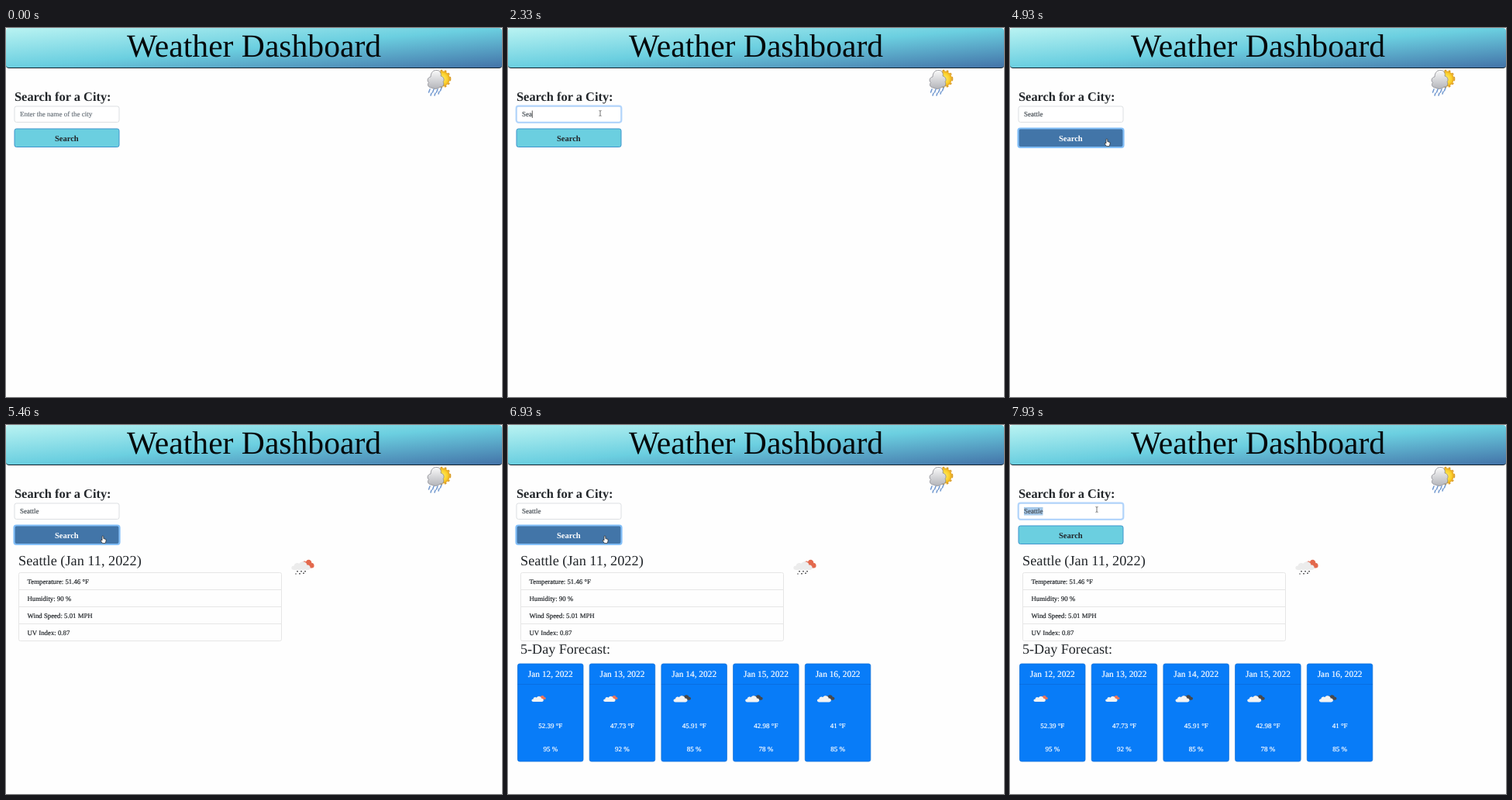
An HTML page that plays this animation: 640x476 px, repeating every 8 s.

```html
<!DOCTYPE html>
<html lang="en">
<head>
<meta charset="utf-8">
<title>Weather Dashboard</title>
<style>
  html, body { margin: 0; width: 100%; height: 100%; overflow: hidden; background: #fefefe; }
  header {
    position: absolute; inset: 0 0 auto; height: 51px; border-bottom: 1.5px solid #10202b; border-radius: 4px;
    background: linear-gradient(to bottom right, #b9f3f2, #6bcfe0 50%, #4373a8);
  }
  svg { position: absolute; left: 0; top: 0; font-family: "Liberation Serif", serif; text-rendering: geometricPrecision; fill: #212529; }
  .mid { text-anchor: middle; }
  .bold { font-weight: bold; }
  .line { fill: none; stroke: #e6e6e6; }
  .ring { fill: none; stroke-width: 2.2; }
  #rows text { stroke: #212529; stroke-width: .2; }
  .card text { stroke: #fff; stroke-width: .2; }
</style>
</head>
<body>
<header></header>
<svg width="640" height="476" viewBox="0 0 640 476">
  <defs>
    <linearGradient id="silver" x2="0" y2="1">
      <stop stop-color="#fafafa"/><stop offset="1" stop-color="#b4b5ba"/>
    </linearGradient>
    <radialGradient id="gold"><stop stop-color="#fff06a"/><stop offset=".7" stop-color="#fbd02c"/><stop offset="1" stop-color="#e9a51c"/></radialGradient>
    <path id="cloud" d="M-10 5C-15 5-15-1-10-1C-10-5-5-6-3-4C0-9 8-7 8-2C13-3 15 5 9 5Z"/>
    <g id="sunny">
      <use href="#cloud" transform="translate(4 -1) scale(.42)" fill="#e9735a"/>
      <use href="#cloud" transform="translate(-1 1) scale(.58)" fill="#f3f3f3"/>
    </g>
    <g id="cloudy">
      <use href="#cloud" transform="translate(4 -1) scale(.56)" fill="#46484c"/>
      <use href="#cloud" transform="translate(-2 1) scale(.68)" fill="#f3f3f3"/>
    </g>
  </defs>

  <text class="mid" x="320" y="37" font-size="41.6" fill="#050a0c">Weather Dashboard</text>

  <circle cx="562.5" cy="65.500" r="10.200" fill="url(#gold)"/>
  <circle cx="562.5" cy="65.500" r="10.800" fill="none" stroke="#dca02c" stroke-width="2" stroke-dasharray="2.700"/>
  <path d="M549 77c-4 0-6-4-3.500-6.500c-3-3-1-7 2.500-7.500c0-6 4-9 8-8.500c4 0 6 4 5 7.500c4 1 5 5 3 7.500c2 3 0 7-4 6.500c-3 3-8 3-11 1z" fill="url(#silver)" stroke="#88888e" stroke-width=".8"/>
  <path d="M547 79l-1.500 4M552 79l-1.500 4M557 79l-1.500 4M562 77l-1.500 4M549 84l-1 3M554 84l-1 3M559 82l-1 3" stroke="#6f97cf" stroke-width="1.500" stroke-linecap="round"/>

  <text class="bold" x="11" y="94" font-size="16.4">Search for a City:</text>
  <rect x="11" y="101" width="135" height="20.5" rx="2.5" fill="#fff" stroke="#dcdfe2"/>
  <rect id="fieldRing" class="ring" x="10.7" y="100.7" width="135.6" height="21.1" rx="3" stroke="#b3d5fb"/>
  <rect id="selection" x="18" y="106" height="10.5" fill="#a6c9ea"/>
  <text id="entry" x="18" y="114" font-size="9" stroke-width=".2"></text>
  <path id="caret" d="M0 106.5V116" stroke="#333" stroke-width=".8"/>

  <rect x="11" y="130" width="135" height="23.5" rx="2.5" fill="#6bcfe0" stroke="#3f95cd"/>
  <text class="mid bold" x="78.3" y="145.5" font-size="10.5">Search</text>
  <g id="hover">
    <rect x="10.5" y="129.5" width="136" height="24.5" rx="3" fill="#4275a8"/>
    <text class="mid bold" x="78.3" y="145.5" font-size="10.5" fill="#fff">Search</text>
  </g>
  <rect id="buttonRing" class="ring" x="10.5" y="129.5" width="136" height="24.5" rx="3" stroke="#83bff8"/>

  <g id="today">
    <text x="16" y="181" font-size="18.3">Seattle (Jan 11, 2022)</text>
    <rect class="line" x="16.5" y="190.5" width="339" height="88" rx="2"/>
    <g id="rows" font-size="8.8"></g>
    <g id="todayIcon">
      <use href="#cloud" transform="translate(389 180) scale(.68 .9)" fill="#e3694d"/>
      <use href="#cloud" transform="translate(381 182.500) scale(.92)" fill="#ececec"/>
      <path d="M376 188v1.5M381 188v1.5M386 188v1.5M374 191.500v1M379 191v1.500M384 190.500v1.500" stroke="#3d3d40" stroke-width="1.6"/>
    </g>
  </g>
  <g id="forecast">
    <text x="16" y="295" font-size="18.1">5-Day Forecast:</text>
  </g>

  <g id="pointer">
    <path id="arrow" d="M0 0V6.500L1.500 5.200L2.500 7.400L3.600 6.900L2.600 4.800H4.600Z" fill="#111" stroke="#fff" stroke-width=".5"/>
    <path id="beam" d="M-1.500-3.500Q0-3.500 0-2.500Q0-3.500 1.500-3.500M0-2.500V2.500M-1.500 3.500Q0 3.500 0 2.500Q0 3.500 1.500 3.500" fill="none" stroke="#555" stroke-width=".8"/>
    <path id="hand" d="M-1 0Q0-1 .8 0V3L4 4V6.500L3 9H-.5L-3 5.500L-2 4.600L-1 5.500Z" fill="#fff" stroke="#222" stroke-width=".7"/>
  </g>
</svg>
<script>
const $ = id => document.getElementById(id);
const show = (id, on) => $(id).style.opacity = +on;

["Temperature: 51.46 °F", "Humidity: 90 %", "Wind Speed: 5.01 MPH", "UV Index: 0.87"].forEach((label, i) => {
  const y = 190.5 + 22 * i;
  $("rows").innerHTML += `<text x="27.5" y="${y + 14}">${label}</text>` + (i ? `<path class="line" d="M16.500 ${y}H355.500"/>` : "");
});

[["52.39", 95], ["47.73", 92], ["45.91", 85], ["42.98", 78], ["41", 85]].forEach(([temp, humidity], i) => {
  const icon = i < 2 ? "sunny" : "cloudy";
  $("forecast").innerHTML += `<g transform="translate(${12.5 + 92.7 * i} 308)" class="card mid" fill="#fff" font-size="9">
    <rect width="84.500" height="126" rx="2.500" fill="#087cf8" stroke="#1471d8" stroke-width=".8"/>
    <path d="M0 26.500H84.500" stroke="#0a6ee0"/>
    <text x="42.300" y="17" font-size="11.400">Jan ${12 + i}, 2022</text>
    <use class="icon" href="#${icon}" x="27" y="45"/>
    <text x="42.300" y="83">${temp} °F</text>
    <text x="42.300" y="113">${humidity} %</text></g>`;
});
const icons = document.querySelectorAll(".icon");

const LOOP = 8000, FOCUS = 1260, CLICK = 4730, REFOCUS = 7730;
const CITY = "Seattle", KEYS = [1730, 2060, 2330, 2800, 2930, 3060, 3260];
const PATH = [[460, 640, 165], [660, 350, 168], [800, 350, 168], [1200, 119, 110], [3600, 119, 110],
  [3930, 205, 113], [4400, 125, 143.5], [6930, 125, 143.5], [7730, 112, 109], [LOOP, 112, 109]];

const clamp = v => Math.max(0, Math.min(1, v));
const fade = (t, start) => clamp((t - start) / 150);

function pointerAt(t) {
  const i = Math.max(1, PATH.findIndex(p => p[0] > t));
  const [a, b] = [PATH[i - 1], PATH[i]];
  const u = clamp((t - a[0]) / (b[0] - a[0])), s = u * u * (3 - 2 * u);
  return [a[1] + (b[1] - a[1]) * s, a[2] + (b[2] - a[2]) * s];
}

function draw(t) {
  const typed = KEYS.filter(k => k <= t).length;
  const entry = $("entry");
  entry.textContent = typed ? CITY.slice(0, typed) : "Enter the name of the city";
  entry.style.fill = entry.style.stroke = typed ? "#495057" : "#6c757d";
  const width = typed ? entry.getComputedTextLength() : 0;
  const lastKey = typed ? KEYS[typed - 1] : FOCUS;
  const blinkOn = Math.floor((t - lastKey) / 500) % 2 === 0;
  $("caret").setAttribute("transform", `translate(${18.3 + width} 0)`);
  show("caret", t >= FOCUS && t < CLICK && blinkOn);
  $("selection").setAttribute("width", width);
  show("selection", t >= 7800);

  show("fieldRing", fade(t, FOCUS) - fade(t, CLICK) + fade(t, REFOCUS));
  show("buttonRing", fade(t, CLICK) - fade(t, REFOCUS));
  show("hover", fade(t, 4250) - fade(t, 7270));

  show("today", t >= 5130);
  show("todayIcon", t >= 5200);
  show("forecast", t >= 5530);
  icons.forEach(icon => icon.style.opacity = +(t >= 5600));

  const [x, y] = pointerAt(t);
  const inside = (top, bottom) => x > 11 && x < 146 && y > top && y < bottom;
  const onField = inside(101, 122), onButton = inside(130, 154);
  $("pointer").setAttribute("transform", `translate(${x} ${y})`);
  show("pointer", t >= 460);
  show("beam", onField);
  show("hand", onButton);
  show("arrow", !onField && !onButton);
}

function tick() {
  draw(performance.now() % LOOP);
  requestAnimationFrame(tick);
}
tick();
</script>
</body>
</html>
```
